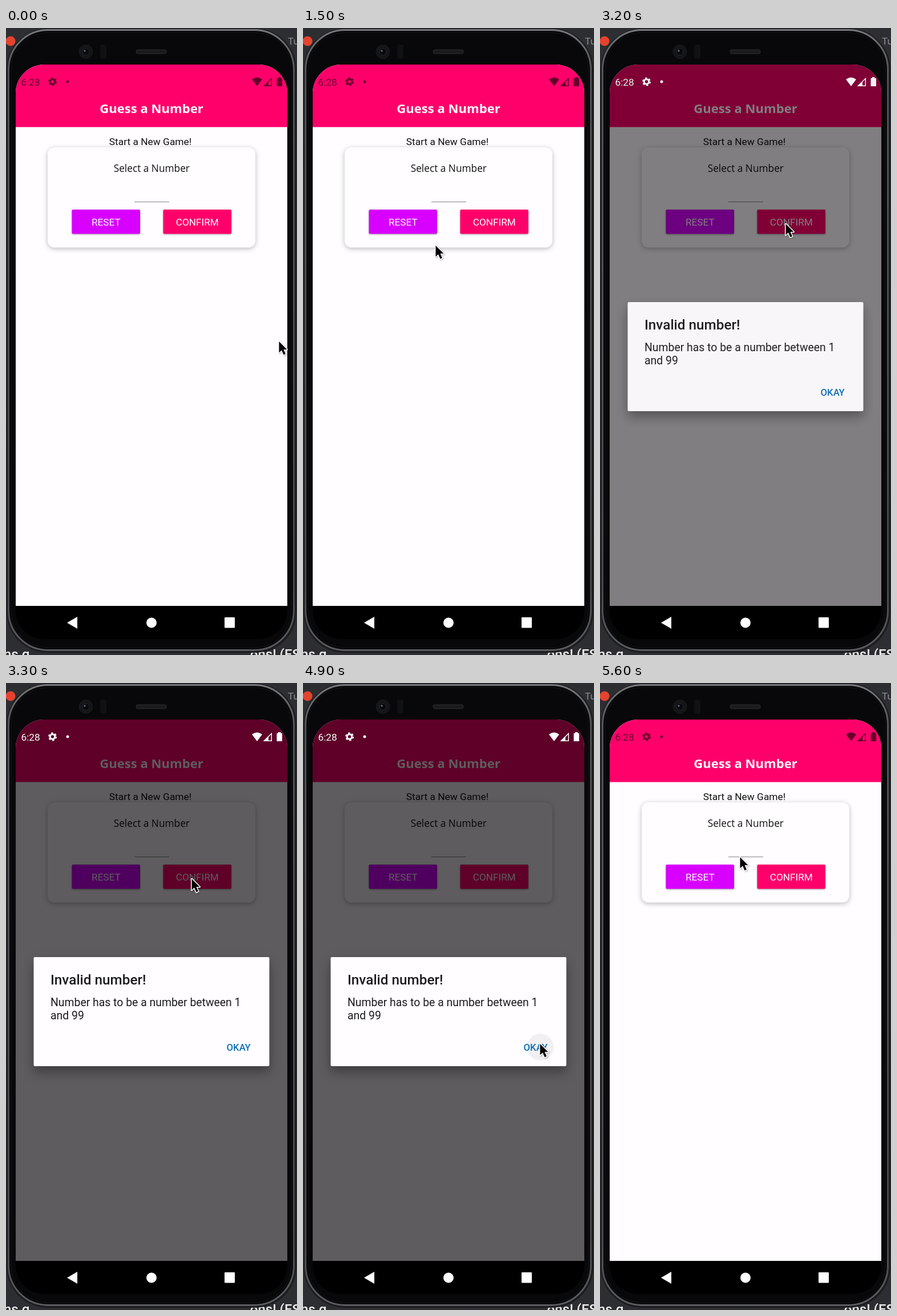
Animation of 510x1098 px, one loop 5.7 s. Source, as an HTML page:

```html
<!DOCTYPE html>
<html lang="en">
<head>
<meta charset="utf-8">
<title>Guess a Number</title>
<style>
  html, body { margin: 0; width: 100%; height: 100%; overflow: hidden; background: #2d2e31; }
  svg { display: block; width: 510px; height: 1098px; }
  text { font: 17.2px Roboto, sans-serif; fill: #111; }
  .mid { text-anchor: middle; }
  .open { font-family: "Open Sans", sans-serif; }
  .title { font-size: 22.1px; font-weight: 700; fill: #fff; }
  .label { fill: #fff; }
  .heading { font-size: 24.3px; font-weight: 500; fill: #1c1b1d; }
  .message { font-size: 19.4px; fill: #1c1b1d; }
  .action { font-size: 16.8px; font-weight: 500; fill: #0b70b8; }
  .page { font-size: 24px; font-weight: 500; fill: #eee; }
  .card { fill: #fffdff; filter: drop-shadow(0 2px 4px rgba(0, 0, 0, .28)); }
  .button { filter: drop-shadow(0 1px 1.5px rgba(0, 0, 0, .35)); }
  .panel { fill: #fffdff; filter: drop-shadow(0 10px 10px rgba(0, 0, 0, .35)); }
  #cursor { filter: drop-shadow(1px 1px 1px rgba(0, 0, 0, .3)); }
  #status text { fill: currentColor; }
</style>
</head>
<body>
<svg viewBox="0 0 510 1098">
  <defs>
    <clipPath id="display">
      <path d="M17 1012V114A50 50 0 0 1 67 64H443A50 50 0 0 1 493 114V1012Z"/>
    </clipPath>
    <linearGradient id="rim" x2="0" y2="1">
      <stop stop-color="#77787c"/>
      <stop offset=".07" stop-color="#515256"/>
      <stop offset=".9" stop-color="#47484b"/>
      <stop offset="1" stop-color="#5c5d61"/>
    </linearGradient>
    <g id="status" fill="currentColor">
      <text x="26.5" y="101">6:28</text>
      <circle cx="81.5" cy="94" r="4.2" fill="none" stroke="currentColor" stroke-width="3"/>
      <circle cx="81.5" cy="94" r="6.4" fill="none" stroke="currentColor" stroke-width="2.2" stroke-dasharray="3.6 3.1"/>
      <circle cx="108" cy="94" r="2.5"/>
      <path d="M431 90Q440 83 449 90L440 102Z"/>
      <path d="M452.5 101.3H465.3V88.5Z" fill="none" stroke="currentColor" stroke-width="1.5"/>
      <path d="M451 102L460 93V102Z"/>
      <path d="M474.5 88H477V86H481.5V88H484V102H474.5Z"/>
    </g>
  </defs>

  <!-- page behind the phone -->
  <rect width="510" height="1098" fill="#2d2e31"/>
  <circle cx="8" cy="23" r="8.5" fill="#e5432f"/>
  <text x="494" y="29" style="fill:#8d8e91">Tu</text>
  <text class="page" x="-4" y="1105">ns g</text>
  <text class="page" x="516" y="1105" text-anchor="end">ons! (ES</text>

  <!-- phone body -->
  <rect x="1" y="1" width="508" height="1093" rx="72" fill="#1b1c1e"/>
  <rect x="4.5" y="3.5" width="500" height="1086" rx="69" fill="#080709" stroke="url(#rim)" stroke-width="3"/>
  <rect x="9" y="8" width="491" height="1077" rx="64" fill="none" stroke="#151517"/>
  <rect x="17" y="900" width="476" height="170" rx="50"/>
  <rect x="228" y="38" width="53" height="7" rx="3" fill="#1b1b1d" stroke="#2b2b2d"/>
  <circle cx="140" cy="41.5" r="12" fill="#141518" stroke="#1a1b1f"/>
  <circle cx="140" cy="41.5" r="6" fill="#08090d" stroke="#24262c"/>
  <circle cx="138" cy="40" r="1.8" fill="#5b6472"/>
  <rect x="165" y="29" width="11" height="25" rx="4" fill="#101113"/>

  <!-- app -->
  <g clip-path="url(#display)">
    <rect x="17" y="64" width="476" height="948" fill="#fffdff"/>
    <rect x="17" y="64" width="476" height="109.5" fill="#ff006b"/>
    <use href="#status" color="#000" opacity=".6"/>
    <text class="mid open title" x="255" y="149">Guess a Number</text>
    <text class="mid" x="253" y="205" style="font-size:17.35px">Start a New Game!</text>
    <rect class="card" x="73" y="209" width="364" height="175.5" rx="12"/>
    <text class="mid open" x="255.3" y="252" style="font-size:17.3px">Select a Number</text>
    <path d="M225 304.5H286" stroke="#858385" stroke-width="1.2"/>
    <rect class="button" x="115.5" y="318" width="119.5" height="42.5" rx="2" fill="#d800ff"/>
    <rect class="button" x="275.5" y="318" width="119.5" height="42.5" rx="2" fill="#ff006b"/>
    <text class="mid label" x="175.3" y="346">RESET</text>
    <text class="mid label" x="335.3" y="346">CONFIRM</text>
    <rect id="dim" x="17" y="64" width="476" height="948" fill="#020003"/>
  </g>

  <g id="dialog">
    <use href="#status" color="#fff"/>
    <rect class="panel" x="48.5" y="480" width="413" height="191" rx="2"/>
    <text class="heading" x="78" y="528">Invalid number!</text>
    <text class="message" x="78" y="566">Number has to be a number between 1</text>
    <text class="message" x="78" y="588.5">and 99</text>
    <circle id="ripple" cx="416" cy="637.5" r="23.5" fill-opacity=".055"/>
    <text class="action" x="386.5" y="643.5">OKAY</text>
  </g>

  <!-- navigation bar -->
  <g fill="#fff">
    <path d="M107 1041.5L125 1031V1052Z"/>
    <circle cx="255" cy="1041.5" r="9"/>
    <rect x="383" y="1032" width="18" height="18.5" rx="1"/>
  </g>

  <path id="cursor" d="M.5 1V20.5L5 16.3L8.6 24.3L12 22.8L8.5 15H14.5Z"
        stroke="#fff" stroke-width="3" stroke-linejoin="round" paint-order="stroke"/>
</svg>
<script>
  const DURATION = 5700, STEP = 100;
  const $ = id => document.getElementById(id);
  const smooth = u => u * u * (3 - 2 * u);
  const linear = u => u;

  // Each key: time in ms, then the values at that time.
  const cursorKeys = [
    [0, 478, 548], [600, 400, 465], [1000, 310, 440], [1500, 232, 380],
    [1800, 240, 370], [2400, 325, 342], [3600, 325, 342], [4300, 410, 629],
    [4600, 415, 631], [5000, 415, 631], [5400, 258, 322], [5600, 245, 304]
  ];
  // Dim strength, dialog opacity.
  const overlayKeys = [
    [3000, 0, 0], [3100, .22, .4], [3200, .5, .95], [3300, .635, 1],
    [4900, .635, 1], [5000, .265, .11], [5100, 0, 0]
  ];

  function sample(keys, t, ease) {
    const next = keys.findIndex(k => k[0] > t);
    if (next === 0) return keys[0].slice(1);
    if (next < 0) return keys[keys.length - 1].slice(1);
    const a = keys[next - 1], b = keys[next];
    const u = ease((t - a[0]) / (b[0] - a[0]));
    return a.slice(1).map((v, i) => v + (b[i + 1] - v) * u);
  }

  function draw(now) {
    const t = Math.floor(now % DURATION / STEP) * STEP;
    const [x, y] = sample(cursorKeys, t, smooth);
    const [dim, opacity] = sample(overlayKeys, t, linear);
    $("cursor").setAttribute("transform", `translate(${x} ${y})`);
    $("dim").style.opacity = dim;
    $("dialog").style.opacity = opacity;
    $("ripple").style.opacity = t === 4900 ? 1 : 0;
  }

  const start = performance.now();
  function loop() {
    draw(performance.now() - start);
    requestAnimationFrame(loop);
  }
  loop();
</script>
</body>
</html>
```
